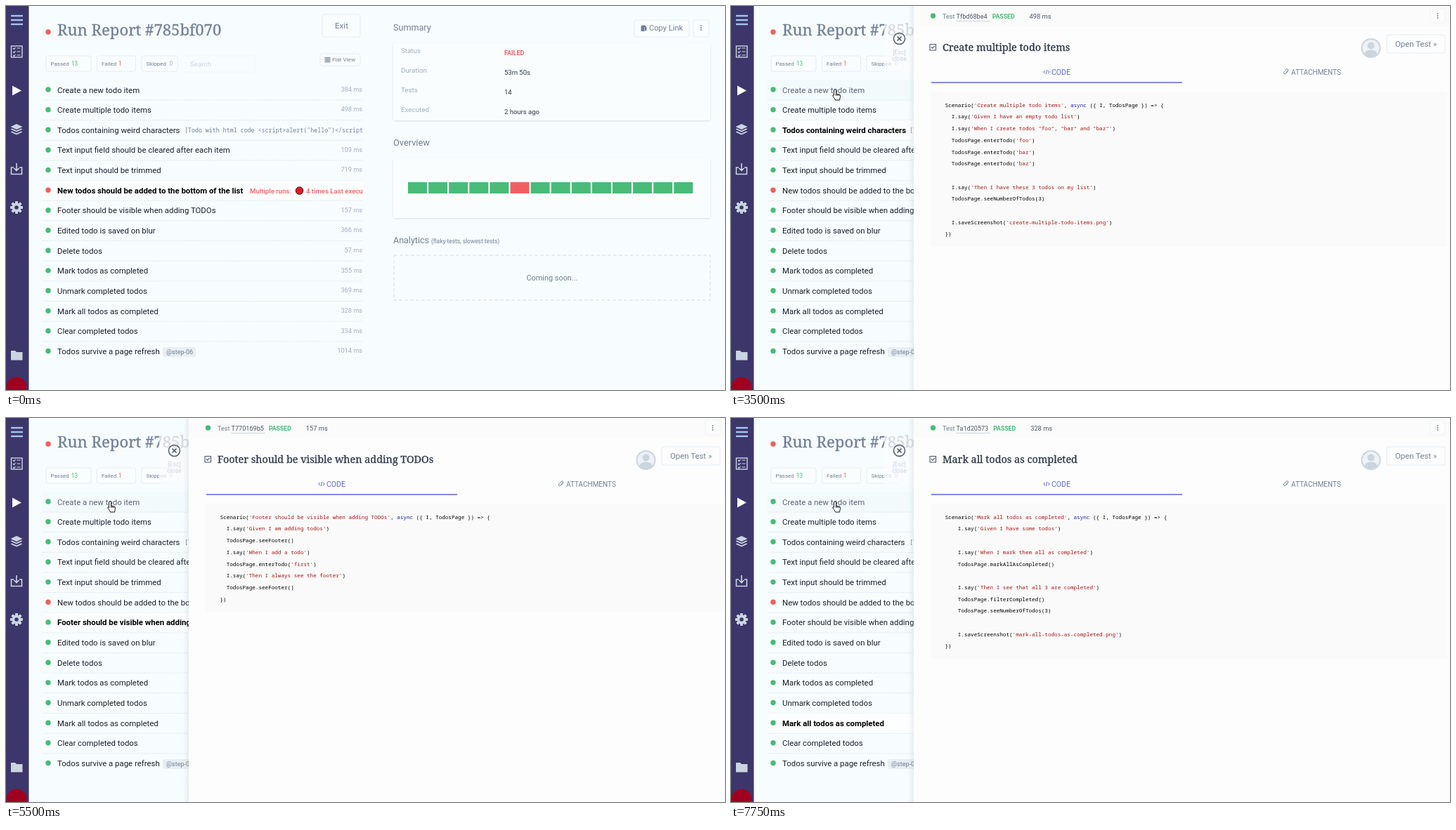
An HTML page that plays this animation: 1023x547 px, repeating every 8 s.

```html
<!DOCTYPE html>
<html lang="en">
<head>
<meta charset="utf-8">
<title>Run report</title>
<style>
  html, body { margin: 0; width: 100%; height: 100%; overflow: hidden; background: #f7fcfe; }
  #stage { display: block; width: 100vw; height: 100vh; font-family: Roboto, sans-serif; }
  text { white-space: pre; }
  .serif { font-family: "Noto Serif", serif; stroke: currentColor; stroke-width: .3; }
  .mono { font-family: "Noto Sans Mono", monospace; }
  .bold { font-weight: 700; }
  .medium { font-weight: 500; }
</style>
</head>
<body>
<svg id="stage" viewBox="0 0 1023 547">
  <defs>
    <filter id="shadow" x="-10%" y="-10%" width="120%" height="130%">
      <feDropShadow dx="0" dy="1" stdDeviation="1" flood-opacity=".13"/>
    </filter>
    <linearGradient id="edge">
      <stop offset="0" stop-color="#8aa" stop-opacity="0"/>
      <stop offset="1" stop-color="#8aa" stop-opacity=".16"/>
    </linearGradient>
    <clipPath id="listClip"><path d="M50 100H508V547H50z"/></clipPath>
  </defs>
  <rect width="1023" height="547" fill="#f7fcfe"/>
  <g id="page"></g>
  <g id="list" clip-path="url(#listClip)"></g>
  <g id="panel"></g>
  <path id="cursor" fill="#fff" stroke="#111" stroke-linejoin="round"
    d="M4 .5c1 0 1.5.7 1.5 1.5v4.5l5 1.2c.9.2 1 .8 1 1.6 0 2.4-.6 3.6-1 6.2h-6C3.5 13 1.5 11 .8 9.5c-.4-1 .8-1.6 1.7-.6V2C2.5 1.2 3 .5 4 .5zM5.5 6.5v3M7.7 7v2.5M9.8 7.5v2"/>
</svg>
<script>
const GREEN = '#48bb78', RED = '#f05f60', SLATE = '#718096', MUTED = '#a0aec0', DARK = '#2d3748';
const LINE = '#e2e8f0', INDIGO = '#5a67d8', ICON = '#cbd5e0';
const $ = id => document.getElementById(id);

const escape = s => s.replace(/&/g, '&amp;').replace(/</g, '&lt;');
// y is the middle of the capitals
const markup = (x, y, inner, size, fill, attrs = '') =>
  `<text x="${x}" y="${y + size * .355}" font-size="${size}" fill="${fill}" color="${fill}" ${attrs}>${inner}</text>`;
const text = (x, y, s, ...style) => markup(x, y, escape(s), ...style);
const rect = (x, y, w, h, fill, attrs = '') =>
  `<rect x="${x}" y="${y}" width="${w}" height="${h}" fill="${fill}" ${attrs}/>`;
const dot = (x, y, r, fill, attrs = '') => `<circle cx="${x}" cy="${y}" r="${r}" fill="${fill}" ${attrs}/>`;
const path = (d, attrs) => `<path d="${d}" ${attrs}/>`;
const button = (x, y, w, h, fill = '#fafdfe') => rect(x, y, w, h, fill, 'rx="3" stroke="#e6ecf2"');
const stroke = (color, width = 1) => `fill="none" stroke="${color}" stroke-width="${width}"`;
const kebab = (x, y) => [-3, 0, 3].map(d => dot(x, y + d, 1, SLATE)).join('');

const tests = [
  ['Create a new todo item', 384, 'T30395e02', `
  I.say('Given I have an empty todo list')

  I.say('When I create a todo "foo"')
  TodosPage.enterTodo('foo')

  I.say('Then I see the new todo on my list')
  TodosPage.seeNumberOfTodos(1)

  I.saveScreenshot('create-todo-item.png')
});`],
  ['Create multiple todo items', 498, 'Tfbd68be4', `
  I.say('Given I have an empty todo list')
  I.say('When I create todos "foo", "bar" and "baz"')
  TodosPage.enterTodo('foo')
  TodosPage.enterTodo('bar')
  TodosPage.enterTodo('baz')

  I.say('Then I have these 3 todos on my list')
  TodosPage.seeNumberOfTodos(3)

  I.saveScreenshot('create-multiple-todo-items.png')
})`],
  ['Todos containing weird characters', 652, 'T8c14e7a3', `
  I.say('Given I have an empty todo list')

  I.say('When I enter a todo with html code')
  TodosPage.enterTodo(todo)

  I.say('Then I see the todo on my list')
  TodosPage.seeNumberOfTodos(1)
  await TodosPage.seeNthTodoEquals(1, todo)

  I.say('When I refresh the page')
  TodosPage.refresh()

  I.say('Then I still see the same todo')
  await TodosPage.seeNthTodoEquals(1, todo)
})`],
  ['Text input field should be cleared after each item', 109, 'T61d0b9f5', `
  I.say('Given I have an empty todo list')

  I.say('When I enter a new todo')
  TodosPage.enterTodo('foo')

  I.say('Then the text input field is cleared')
  TodosPage.seeEmptyInput()

  I.say('When I enter another todo')
  TodosPage.enterTodo('bar')

  TodosPage.seeEmptyInput()
})`],
  ['Text input should be trimmed', 719, 'T3228f289', `
  I.say('Given I have an empty todo list')
  I.say('When I enter a todo with whitespace around the text')
  TodosPage.enterTodo('       Todo with lots of whitespace around       ')

  I.say('Then I see the trimmed text of the todo in the list')
  await TodosPage.seeNthTodoEquals(1, 'Todo with lots of whitespace around')
})`],
  ['New todos should be added to the bottom of the list', 941, 'T94e5a1c7', `
  I.say('Given I added some todos')
  TodosPage.enterTodo('first')
  TodosPage.enterTodo('second')
  await TodosPage.seeNthTodoEquals(1, 'first')
  await TodosPage.seeNthTodoEquals(2, 'second')

  I.say('When I add another todo')
  TodosPage.enterTodo('last')

  I.say('Then it is at the bottom of the list')
  await TodosPage.seeNthTodoEquals(3, 'last')
})`],
  ['Footer should be visible when adding TODOs', 157, 'T770169b5', `
  I.say('Given I am adding todos')
  TodosPage.seeFooter()
  I.say('When I add a todo')
  TodosPage.enterTodo('first')
  I.say('Then I always see the footer')
  TodosPage.seeFooter()
})`],
  ['Edited todo is saved on blur', 366, 'T2f7b80d6', `
    I.say('Given I have some todos')

    I.say('When I edit the first todo')
    TodosPage.editNthTodo(1, 'boom')

    I.say('And I leave the input field')
    TodosPage.blurInput()

    I.say('Then the todo is saved')
    await TodosPage.seeNthTodoEquals(1, 'boom')
})`],
  ['Delete todos', 57, 'Tb4c26a6c', `
    I.say('Given I have some todos')
    I.say('When I delete the first todo')
    TodosPage.deleteNthTodo(1)

    I.say('Then the todo should disappear from the list')
    TodosPage.seeNumberOfTodos(2)
})`],
  ['Mark todos as completed', 355, 'T05e9d3b8', `
    I.say('Given I have some todos')

    I.say('When I mark the first todo as completed')
    TodosPage.markNthAsCompleted(1)

    I.say('Then I see that it is completed')
    TodosPage.filterCompleted()
    TodosPage.seeNumberOfTodos(1)

    I.saveScreenshot('mark-todos-as-completed.png')
})`],
  ['Unmark completed todos', 369, 'Tc83a46f1', `
    I.say('Given I have some completed todos')
    TodosPage.markNthAsCompleted(1)

    I.say('When I unmark the first todo')
    TodosPage.unmarkNthAsCompleted(1)

    I.say('Then I see that it is active')
    TodosPage.filterActive()
    TodosPage.seeNumberOfTodos(3)
})`],
  ['Mark all todos as completed', 328, 'Ta1d20573', `
    I.say('Given I have some todos')

    I.say('When I mark them all as completed')
    TodosPage.markAllAsCompleted()

    I.say('Then I see that all 3 are completed')
    TodosPage.filterCompleted()
    TodosPage.seeNumberOfTodos(3)

    I.saveScreenshot('mark-all-todos-as-completed.png')
})`],
  ['Clear completed todos', 334],
  ['Todos survive a page refresh', 1014],
];
const WEIRD = 2, FAILED = 5, TAGGED = 13;
const statusColor = i => i === FAILED ? RED : GREEN;

function sidebar() {
  const gear = [...Array(8).keys()].map(k =>
    rect(-2, -9, 4, 5, ICON, `rx="1" transform="translate(15 287) rotate(${k * 45})"`)).join('');
  const ticks = [60, 65, 70].map(y =>
    path(`M10 ${y}l1.5 1.5 2-2.5M15.5 ${y}h5`, stroke(ICON, 1.2))).join('');
  return rect(0, 0, 32.5, 547, '#3c366b')
    + [14, 20, 26].map(y => rect(7, y - 1.2, 17, 2.4, '#a3c4ee')).join('')
    + rect(7.5, 57, 15.5, 16, 'none', `stroke="${ICON}" stroke-width="1.4"`) + ticks
    + path('M9 113.5L22 120.5 9 127.5z', 'fill="#fff"')
    + path('M15 168l8.5 4-8.5 4-8.5-4zM6.5 175.5l2-1 6.5 3 6.5-3 2 1-8.5 4zM6.5 179.5l2-1 6.5 3 6.5-3 2 1-8.5 4z', `fill="${ICON}"`)
    + path('M11 230H7.5v9.5h15V230H19M15 224v10M11.5 231l3.5 3.5 3.5-3.5', stroke(ICON, 1.6))
    + gear + `<circle cx="15" cy="287" r="4.6" ${stroke(ICON, 3.6)}/>`
    + path('M7 491h6l2 2h8.5v11.5H7z', `fill="${ICON}"`)
    + dot(15, 543, 14.5, '#a00020');
}

function filter(x, w, label, count, countX, color) {
  return button(x, 71, w, 22) + text(x + 6.5, 82, label, 8, SLATE) + text(countX, 82, count, 8.2, color);
}

function summary() {
  const fields = [['Status', 'FAILED'], ['Duration', '53m 50s'], ['Tests', '14'], ['Executed', '2 hours ago']];
  const bars = tests.map((_, i) => rect(572 + i * 29.1, 251, 27, 16, statusColor(i))).join('');
  const card = (y, h) => rect(551, y, 451, h, '#f9fdfe', 'rx="3" filter="url(#shadow)"');
  return text(551, 31, 'Summary', 12.6, SLATE)
    + button(894, 20, 78, 24) + button(978, 20, 22, 24) + kebab(989, 31)
    + path('M904 30v-2.5h5l2.5 2.5v5h-2.5v-5zM903.5 30h5v6h-5z', `fill="${SLATE}"`)
    + text(915, 31.5, 'Copy Link', 11.1, SLATE)
    + card(53, 110)
    + fields.map(([k, v], i) => {
        const y = 64 + i * 27.8;
        return text(562, y, k, 9.8, MUTED)
          + text(709, y + 3, v, i ? 9.5 : 8.9, i ? DARK : RED, i ? '' : 'class="bold"');
      }).join('')
    + text(551, 194.5, 'Overview', 12.8, SLATE) + card(217, 85) + bars
    + text(551, 333.5, 'Analytics', 12.5, SLATE)
    + text(605, 335, '(flaky tests, slowest tests)', 8.4, SLATE)
    + rect(552, 355, 450, 64, 'none', `stroke="${LINE}" stroke-width="1.5" stroke-dasharray="5 3"`)
    + text(777, 387, 'Coming soon...', 10.9, SLATE, 'text-anchor="middle"');
}

function page() {
  return sidebar()
    + dot(60, 37, 3.7, RED) + text(73, 34, 'Run Report #785bf070', 22.1, SLATE, 'class="serif"')
    + button(450, 12, 54, 32) + text(477.5, 28, 'Exit', 11.6, SLATE, 'text-anchor="middle"')
    + filter(57, 64, 'Passed', '13', 93, GREEN) + filter(129.5, 55, 'Failed', '1', 160, RED)
    + filter(193, 51, 'Skipped', '0', 232.5, MUTED)
    + rect(250, 71, 104, 23, 'none', 'rx="3" stroke="#f1f6f9"') + text(262, 82.5, 'Search', 9.7, ICON)
    + button(447, 68, 57, 17)
    + [73, 75, 77, 79].map(y => rect(453.5, y, 8, 1.2, SLATE)).join('')
    + text(464, 76.5, 'Flat View', 8.1, SLATE)
    + summary();
}

function row([name, ms], i, selected, hovered) {
  const y = 119.5 + i * 28.65;
  const bg = hovered ? '#f2fafc' : '#fdfeff';
  const color = hovered ? (selected ? DARK : '#5a6577') : selected ? '#000' : '#1a202c';
  let extra = text(507, y - 1, ms + ' ms', 9.2, MUTED, 'text-anchor="end"');
  if (i === WEIRD)
    extra = text(254, y + .5, '[Todo with html code <script>alert("hello")<\/script>]', 8.3, SLATE, 'class="mono"');
  if (i === FAILED)
    extra = text(347, y + .5, 'Multiple runs:', 9.6, RED, 'class="medium"')
      + dot(417.5, y + .3, 5.3, '#dd1c28', 'stroke="#4a1015"')
      + text(427, y + .5, '4 times Last executed', 9.6, RED, 'class="medium"');
  if (i === TAGGED)
    extra += rect(223, y - 6, 47, 14, '#e8eef2', 'rx="3"') + text(228, y + 1, '@step-06', 9, SLATE);
  return (selected || hovered ? rect(52, y - 14, 456, 28, bg) : '')
    + (i < tests.length - 1 ? path(`M52 ${y + 14.5}H508`, `stroke="${LINE}" stroke-dasharray="2 1"`) : '')
    + dot(60, y - .5, 3.7, statusColor(i))
    + text(73, y, name, 11.4, color, selected ? 'class="bold"' : '') + extra;
}

function codeLine(line, i) {
  const inner = line.split(/('[^']*'|\basync\b|\bawait\b)/).map((part, k) =>
    k % 2 ? `<tspan fill="${part[0] === "'" ? '#a31515' : '#1a1ab0'}">${escape(part)}</tspan>` : escape(part)).join('');
  return markup(304.5, 141 + i * 16.7, inner, 7.63, '#000', 'class="mono"');
}

function details(i) {
  const [name, ms, id, body] = tests[i];
  const lines = `Scenario('${name}', async ({ I, TodosPage }) => {${body}`.split('\n');
  const status = `Test <tspan fill="#4a5568">${id}</tspan>`
    + `<tspan dx="7" class="bold" font-size="8.7" fill="${statusColor(i)}">${i === FAILED ? 'FAILED' : 'PASSED'}</tspan>`
    + `<tspan dx="21" font-size="9.3" fill="#4a5568">${ms} ms</tspan>`;
  return rect(260, 0, 763, 28, '#fbfbfb')
    + dot(287.5, 14, 3.7, statusColor(i)) + markup(301, 14.5, status, 9.1, SLATE)
    + path('M321 21.5H368', `stroke="${MUTED}" stroke-dasharray="1 1"`)
    + rect(995, 3, 21, 21, '#fcfcfc', 'rx="3" stroke="#f1f3f6"') + kebab(1005.5, 14)
    + path('M291.5 54.5H283v8.5h8.5zM285 58.5l1.8 1.8 3.2-3.6', stroke('#4a5568', 1.1))
    + text(301, 58.5, name, 14.4, DARK, 'class="serif"')
    + dot(910.5, 60, 13, '#edf2f7', `stroke="${ICON}" stroke-width="2"`)
    + dot(910.5, 56.5, 5, ICON) + path('M901 69q1.5-6.5 9.5-6.5t9.5 6.5q-9.5 7-19 0z', `fill="${ICON}"`)
    + button(933, 41, 83, 26, '#fdfdfd') + text(945, 54, 'Open Test »', 11.4, SLATE)
    + path('M447 92l-2.2 2 2.2 2M451 92l2.2 2-2.2 2M449.7 91l-1.4 6', stroke(INDIGO))
    + text(456, 94, 'CODE', 10.5, INDIGO)
    + path('M285 109H642', `stroke="${INDIGO}" stroke-width="1.3"`)
    + path('M793 92l-3.5 4q-1.5 1.5-2.7.3t.2-2.6l3.3-3.5q1.2-1 2 0t0 1.9l-3 3.1', stroke(SLATE))
    + text(797, 94, 'ATTACHMENTS', 10, SLATE)
    + rect(283, 122, 736, lines.length * 16.7 + 20, '#fafafa', 'rx="3"')
    + lines.map(codeLine).join('');
}

function panel(shown) {
  if (shown === null) return '';
  return rect(218, 25, 42, 70, '#fbfdfe', 'opacity=".72"')
    + `<circle cx="239.5" cy="46.5" r="8" ${stroke('#4a5568', 1.4)}/>`
    + path('M236.5 43.5l6 6M242.5 43.5l-6 6', stroke('#4a5568', 1.6))
    + text(239.5, 66, '[Esc]', 8.6, ICON, 'text-anchor="middle"')
    + text(239.5, 75, 'close', 8.6, ICON, 'text-anchor="middle"')
    + rect(252, 0, 8, 547, 'url(#edge)') + rect(260, 0, 763, 547, '#fdfdfd')
    + (shown < 0 ? '' : details(shown));
}

// start time, selected row, shown test (null: closed, -1: loading), cursor position
const REST = [144, 118.5];
const scenes = [
  [0, 5, null, null],
  [500, 5, null, [205, 262]],
  [750, 5, null, [190, 214]],
  [1000, 5, null, [160, 148]],
  [1250, 5, null, REST],
  [1500, 0, null, REST],
  [1750, 0, -1, REST],
  [2000, 0, 0, REST],
  [2750, 1, 1, REST],
  [3500, 2, 1, REST],
  [3750, 2, 2, REST],
  [4000, 3, 2, REST],
  [4250, 3, 3, REST],
  [4500, 4, 3, REST],
  [4750, 4, 4, REST],
  [5000, 5, 4, REST],
  [5250, 5, 5, REST],
  [5500, 6, 6, REST],
  [5750, 7, 7, REST],
  [6250, 8, 7, REST],
  [6500, 8, 8, REST],
  [6750, 9, 8, REST],
  [7000, 9, 9, REST],
  [7250, 10, 10, REST],
  [7500, 11, 10, REST],
  [7750, 11, 11, REST],
];

let current;
function render(now) {
  const time = now % 8000;
  const scene = scenes.findLast(([start]) => start <= time);
  if (scene !== current) {
    current = scene;
    const [, selected, shown, cursor] = scene;
    const hovered = cursor ? Math.floor((cursor[1] - 105) / 28.65) : -1;
    $('list').innerHTML = tests.map((test, i) => row(test, i, i === selected, i === hovered)).join('');
    $('panel').innerHTML = panel(shown);
    $('cursor').setAttribute('transform', `translate(${cursor || [-50, 0]})`);
  }
}

$('page').innerHTML = page();
const begin = performance.now();
render(0);
requestAnimationFrame(function tick() {
  render(performance.now() - begin);
  requestAnimationFrame(tick);
});
</script>
</body>
</html>
```
